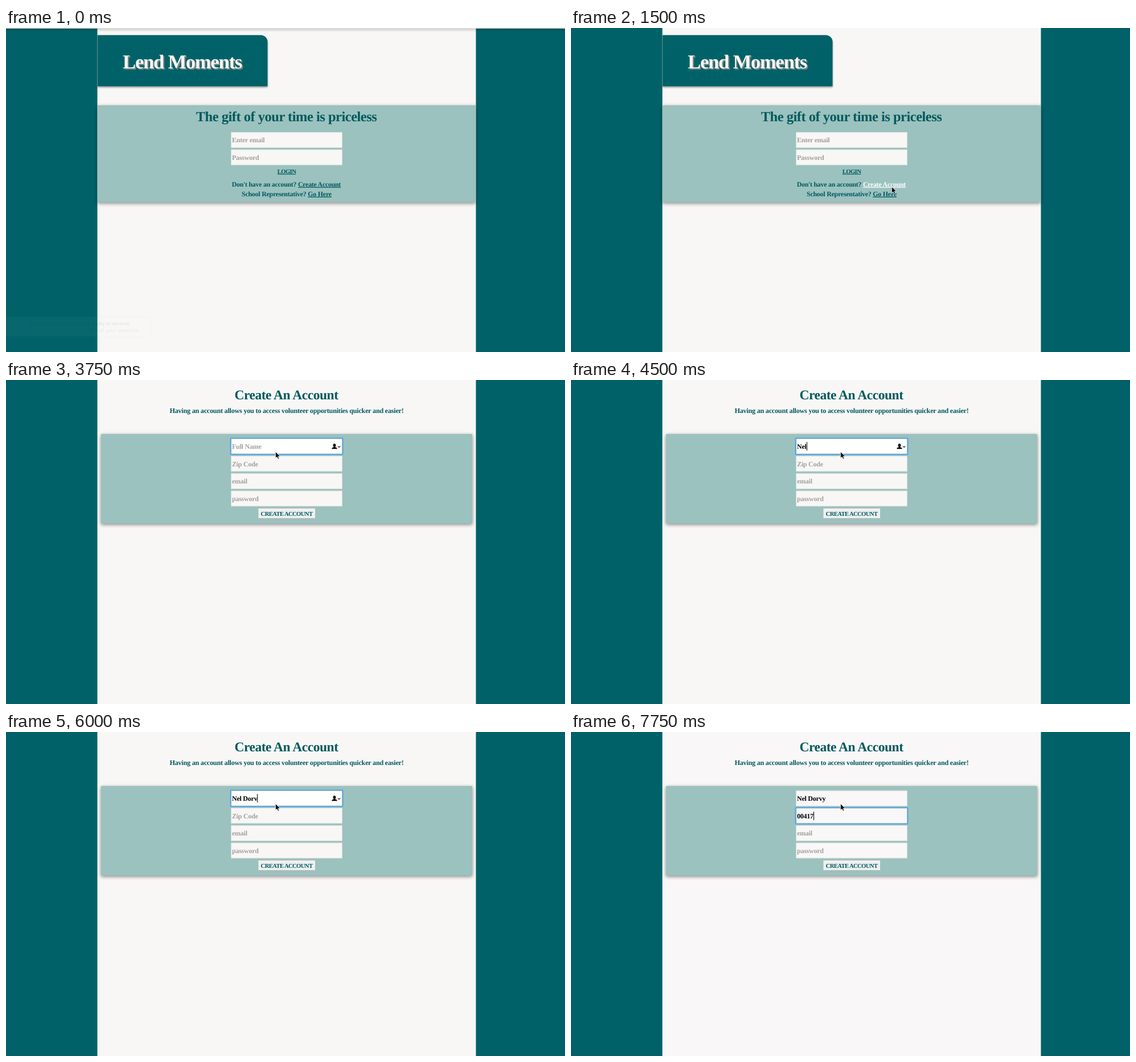
Animation of 982x570 px, one loop 8 s. Source, as an HTML page:

```html
<!DOCTYPE html>
<html lang="en">
<head>
<meta charset="utf-8">
<title>Sign up</title>
<style>
  html, body { margin: 0; width: 100%; height: 100%; overflow: hidden; background: #006268; }
  svg { display: block; width: 982px; height: 570px; }
  text {
    font: bold 12px "Liberation Serif", serif;
    letter-spacing: -.02em;
    text-rendering: geometricPrecision;
    fill: #02595f;
    white-space: pre;
  }
  .mid { text-anchor: middle; }
  .caps { font-size: 10.7px; letter-spacing: -.06em; }
  .link { text-decoration: underline; text-decoration-thickness: 1px; text-underline-offset: 1.5px; }
  .logo { font-size: 34.5px; letter-spacing: -.035em; fill: #f8f7f6; text-shadow: 2px 2px 1px #8d8b88; }
  .field { fill: var(--paper); stroke: #d3dcd9; }
  .hint { fill: #a3a19f; }
  .typed { fill: #000; }
  .panel { fill: #9bc2be; filter: drop-shadow(0 2px 3px rgba(0, 0, 0, .45)); }
  .banner { fill: #006268; filter: drop-shadow(0 2px 1.5px rgba(0, 0, 0, .4)); }
  .menu { fill: #f6f6f6; filter: drop-shadow(0 2px 3px rgba(0, 0, 0, .45)); }
  .option { font: 9.3px Inter, sans-serif; letter-spacing: 0; fill: #333; }
  .tip text { font: 8.7px Inter, sans-serif; letter-spacing: 0; fill: #003c40; fill-opacity: .08; }
  #paper { fill: var(--paper); }
  #ring { fill: none; stroke: #62a8de; stroke-width: 2.4; }
</style>
</head>
<body>
<svg id="stage" viewBox="0 0 982 570">
  <defs>
    <linearGradient id="fade" x2="0" y2="1">
      <stop stop-opacity=".2"/><stop offset="1" stop-opacity="0"/>
    </linearGradient>
  </defs>
  <rect width="982" height="570" fill="#006268"/>
  <rect id="paper" x="160.5" width="665" height="570"/>

  <g id="login">
    <path class="banner" d="M161 12.5H447.500a12 12 0 0 1 12 12V102.500H161z"/>
    <text class="logo mid" x="309.5" y="70.5">Lend Moments</text>
    <rect class="panel" x="160.5" y="136" width="665" height="170.5"/>
    <text class="mid" x="492.5" y="163.7" style="font-size:24.5px">The gift of your time is priceless</text>
    <g id="loginFields"></g>
    <text class="mid caps link" x="493" y="255.7">LOGIN</text>
    <text x="396.7" y="278.8" style="font-size:11.85px">Don't have an account? <tspan id="create" class="link">Create Account</tspan></text>
    <text x="414" y="295.8" style="font-size:11.95px">School Representative? <tspan class="link">Go Here</tspan></text>
  </g>

  <g id="signup">
    <text class="mid" x="492.5" y="33.8" style="font-size:23.5px">Create An Account</text>
    <text class="mid" x="493" y="57.5" style="font-size:12.2px">Having an account allows you to access volunteer opportunities quicker and easier!</text>
    <rect class="panel" x="167" y="95" width="652" height="157.5"/>
    <g id="signupFields"></g>
    <rect x="443" y="225.5" width="100.5" height="18" fill="#eff0f0" stroke="#b3b9b9"/>
    <text class="mid caps" x="493" y="238.5">CREATE ACCOUNT</text>
    <rect id="ring" x="394.7" width="196.8" height="28.6" rx="1"/>
    <g id="contact">
      <ellipse cx="577" cy="115" rx="2.4" ry="3"/>
      <path d="M572.3 121.3c0-2.4 2-2.6 3.7-3.3h2c1.7.7 3.7.9 3.7 3.3z"/>
      <path d="M583 116.3l2.2 2.2 2.2-2.2" fill="none" stroke="#222" stroke-width="1.2"/>
    </g>
    <rect id="caret" width="1" height="15"/>
    <g id="menu">
      <rect class="menu" x="395" y="132" width="78" height="56.5"/>
      <text class="option" x="405" y="145.5">Nel Nursery</text>
      <text class="option" x="405" y="164.5">Nel Tovan</text>
      <text class="option" x="405" y="183.5">Nel Quivetta</text>
    </g>
  </g>

  <g id="tip" class="tip">
    <rect x="-2" y="508" width="257" height="34.5" rx="2" fill="#fff" fill-opacity=".03" stroke="#000" stroke-opacity=".015"/>
    <text class="mid" x="127" y="522.5" style="font-weight:bold">Click up here when you're ready to record!</text>
    <text class="mid" x="127" y="534.5">You can move and change the size of your selection.</text>
  </g>
  <g id="topEdge">
    <rect width="982" height="7" fill="url(#fade)"/>
    <rect width="982" height="1" fill="#e6e5e3"/>
  </g>

  <g id="pointer">
    <path id="arrow" d="M.5.3V11.4L3 9.1l1.8 4 1.9-.8L5 8.4H8.5z" stroke="#fff" stroke-width=".7"/>
    <path id="hand" d="M3.2 7V1.5q0-1.2 1-1.2t1 1.2V5q2-.6 2.2.5 1.6-.4 1.8.6 1.3 0 1.3 1.3v2.3L9.3 12.7H4L.8 8.7q-.6-1.4.6-1.5z" fill="#fff" stroke="#000" stroke-width=".9"/>
    <path id="beam" d="M2.5.6q2.2 0 2.5 1.4Q5.3.6 7.5.6M5 2v10M2.5 13.4q2.2 0 2.5-1.4 .3 1.4 2.5 1.4M3.7 7.4h2.6" fill="none" stroke="#222" stroke-width=".9"/>
  </g>
</svg>
<script>
const LOOP = 8000;
const NAME = "Nel Dorvy";
const ZIP = "00417";
// time, characters typed
const NAME_KEYS = [[0, 0], [4250, 1], [4500, 3], [4750, 4], [5250, 5], [5500, 6], [5750, 7], [6000, 8], [6250, 9]];
const ZIP_KEYS = [[0, 0], [7000, 1], [7250, 3], [7500, 4], [7750, 5]];
// time, x, y, shape
const POINTER = [
  [0, 0, 0, ""], [1250, 562, 279, "hand"], [1500, 563, 279, "arrow"],
  [2750, 481, 163, "beam"], [3000, 474, 134, "beam"], [3250, 473, 126, "arrow"]
];

const $ = id => document.getElementById(id);
const show = (id, on) => { $(id).style.display = on ? "" : "none"; };
const latest = (steps, t) => steps.findLast(step => step[0] <= t);

function make(parent, tag, attrs) {
  const node = document.createElementNS("http://www.w3.org/2000/svg", tag);
  for (const key in attrs) node.setAttribute(key, attrs[key]);
  return parent.appendChild(node);
}

function addField(parent, y, hint) {
  const box = make(parent, "rect", { class: "field", x: 395.5, y, width: 195, height: 27 });
  const label = make(parent, "text", { x: 397, y: y + 17.8 });
  const field = {
    box, label, y,
    set(value) {
      const content = value || hint;
      if (label.textContent !== content) label.textContent = content;
      label.setAttribute("class", value ? "typed" : "hint");
    }
  };
  field.set("");
  return field;
}

addField($("loginFields"), 183.5, "Enter email");
addField($("loginFields"), 214, "Password");
const [nameField, zipField] = ["Full Name", "Zip Code", "email", "password"]
  .map((hint, i) => addField($("signupFields"), 103.2 + i * 30.6, hint));

function placeCaret(field, value, on) {
  show("caret", on);
  const width = value ? field.label.getComputedTextLength() : 0;
  $("caret").setAttribute("x", Math.round(397 + width));
  $("caret").setAttribute("y", Math.round(field.y + 6));
}

function render(t) {
  const signup = t >= 2500;
  const focused = t >= 3250;
  const onZip = t >= 6250;
  const refreshed = t >= 7500;

  $("stage").style.setProperty("--paper", refreshed ? "#f9f7f7" : "#f8f7f6");
  show("login", !signup);
  show("signup", signup);
  show("tip", t < 250);
  show("topEdge", t < 500);
  $("create").style.fill = t >= 1250 ? "#fff" : "";

  const name = NAME.slice(0, latest(NAME_KEYS, t)[1]);
  const zip = ZIP.slice(0, latest(ZIP_KEYS, t)[1]);
  nameField.set(name);
  zipField.set(zip);
  nameField.box.style.fill = focused && !refreshed ? "#fff" : "";
  zipField.box.style.fill = onZip && !refreshed ? "#fff" : "";

  const active = onZip ? zipField : nameField;
  const pause = onZip ? t >= 6750 && t < 7000 : t >= 3750 && t < 4250;
  show("ring", focused);
  $("ring").setAttribute("y", active.y - .8);
  show("contact", focused && !onZip);
  show("menu", t >= 5250 && t < 5500);
  placeCaret(active, onZip ? zip : name, focused && !pause);

  const [, x, y, shape] = latest(POINTER, t);
  $("pointer").setAttribute("transform", `translate(${x} ${y})`);
  for (const kind of ["arrow", "hand", "beam"]) show(kind, kind === shape);
}

const start = performance.now();
function tick() {
  render((performance.now() - start) % LOOP);
  requestAnimationFrame(tick);
}
tick();
</script>
</body>
</html>
```
